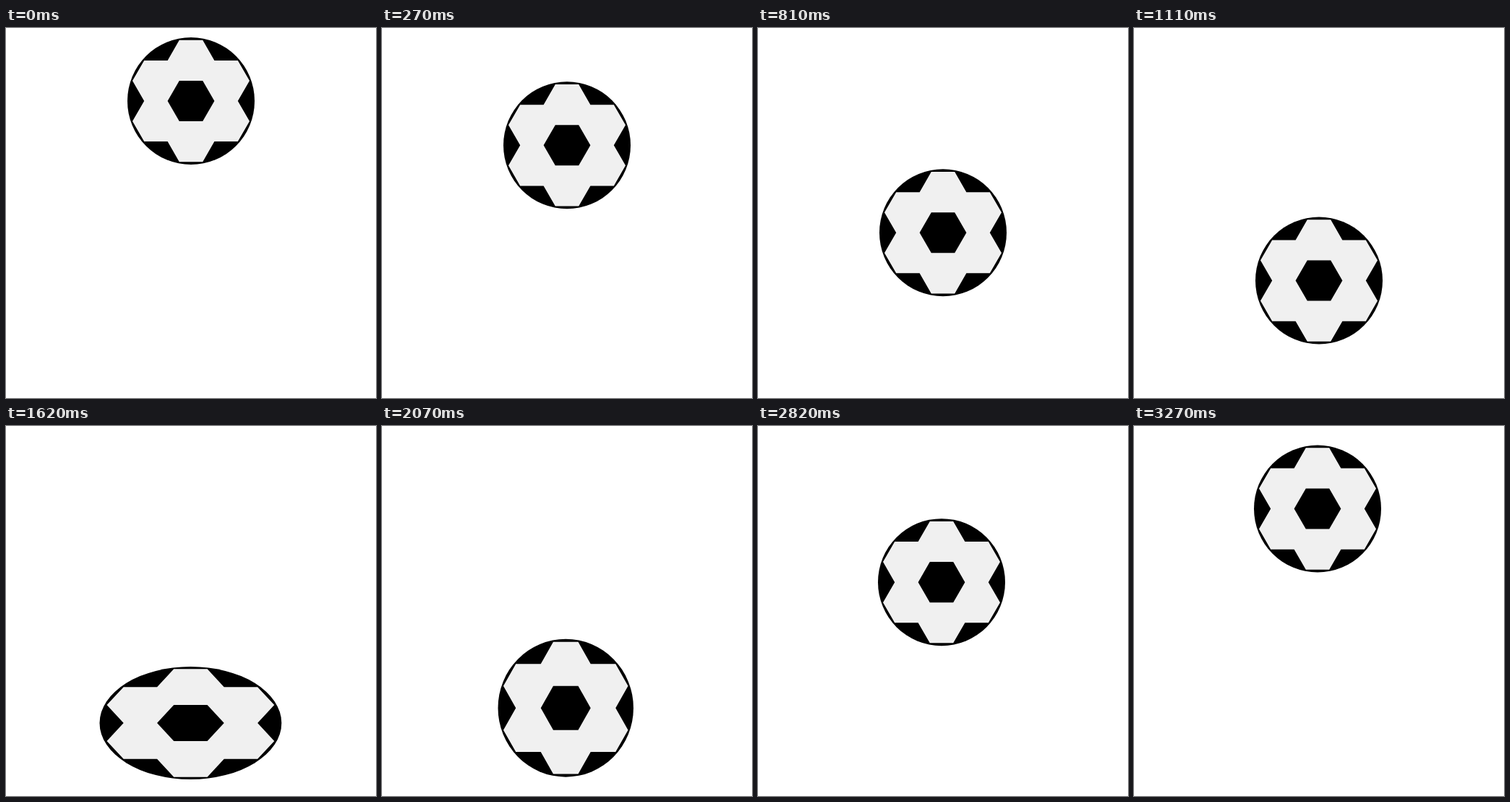
Animation, 512 px wide and 512 px high, one loop 3300 ms. Source, as an HTML page with a canvas:

```html
<!DOCTYPE html>
<html lang="en">
<head>
<meta charset="utf-8">
<title>Bouncing ball</title>
<style>
  html, body { margin: 0; width: 100%; height: 100%; overflow: hidden; background: #fff; }
  canvas { display: block; width: 100vw; height: 100vh; }
</style>
</head>
<body>
<canvas id="stage" width="512" height="512"></canvas>
<script>
const ctx = document.getElementById('stage').getContext('2d');
const LOOP = 3300, STEP = 30;
const RADIUS = 88, SIDE = 32.4, H = SIDE * Math.sqrt(3) / 2;

// Linear interpolation through [time, value] keys, held at both ends
function track(keys, t) {
  if (t <= keys[0][0]) return keys[0][1];
  for (let i = 1; i < keys.length; i++) {
    const [t0, a] = keys[i - 1], [t1, b] = keys[i];
    if (t <= t1) return a + (b - a) * (t - t0) / (t1 - t0);
  }
  return keys[keys.length - 1][1];
}

const driftX = [[1390, 256], [2160, 254]];
const scaleX = [[1290, 1], [1430, 1.585], [2150, 1]];
const scaleY = [[1290, 1], [1430, 0.803], [2160, 1.125], [2340, 1]];

function height(t) {
  if (t < 1390) return 101 + 0.228 * t - 3.7e-6 * t * t;      // fall
  if (t < 1700) return 411;                                   // squash
  if (t < 2160) return 411 - 40 * ((t - 1700) / 460) ** 3;    // push off
  if (t < 2460) {                                             // settle to rising speed
    const s = t - 2160;
    return 371 - 0.264 * s + 6.33e-5 * s * s;
  }
  return 297.5 - 0.2259 * (t - 2460);                         // rise
}

function hexagon(x, y) {
  for (let i = 0; i < 6; i++) {
    const a = i * Math.PI / 3;
    ctx.lineTo(x + SIDE * Math.cos(a), y + SIDE * Math.sin(a));
  }
  ctx.closePath();
}

// Outline of the six light panels around the centre
function star() {
  for (let i = 0; i < 6; i++) {
    const a = i * Math.PI / 3, c = Math.cos(a), s = Math.sin(a);
    for (const [x, y] of [[-SIDE / 2, -3 * H], [SIDE / 2, -3 * H], [SIDE, -2 * H]]) {
      ctx.lineTo(x * c - y * s, x * s + y * c);
    }
  }
  ctx.closePath();
}

function fill(color, shape) {
  ctx.fillStyle = color;
  ctx.beginPath();
  shape();
  ctx.fill();
}

function draw(t) {
  ctx.setTransform(1, 0, 0, 1, 0, 0);
  ctx.fillStyle = '#fff';
  ctx.fillRect(0, 0, 512, 512);
  ctx.translate(track(driftX, t), height(t));
  ctx.scale(track(scaleX, t), track(scaleY, t));
  fill('#000', () => ctx.arc(0, 0, RADIUS, 0, 2 * Math.PI));
  fill('#f0f0f0', star);
  fill('#000', () => hexagon(0, 0));
}

const start = performance.now();
function tick() {
  const t = (performance.now() - start) % LOOP;
  draw(Math.floor(t / STEP) * STEP);
  requestAnimationFrame(tick);
}
tick();
</script>
</body>
</html>
```
